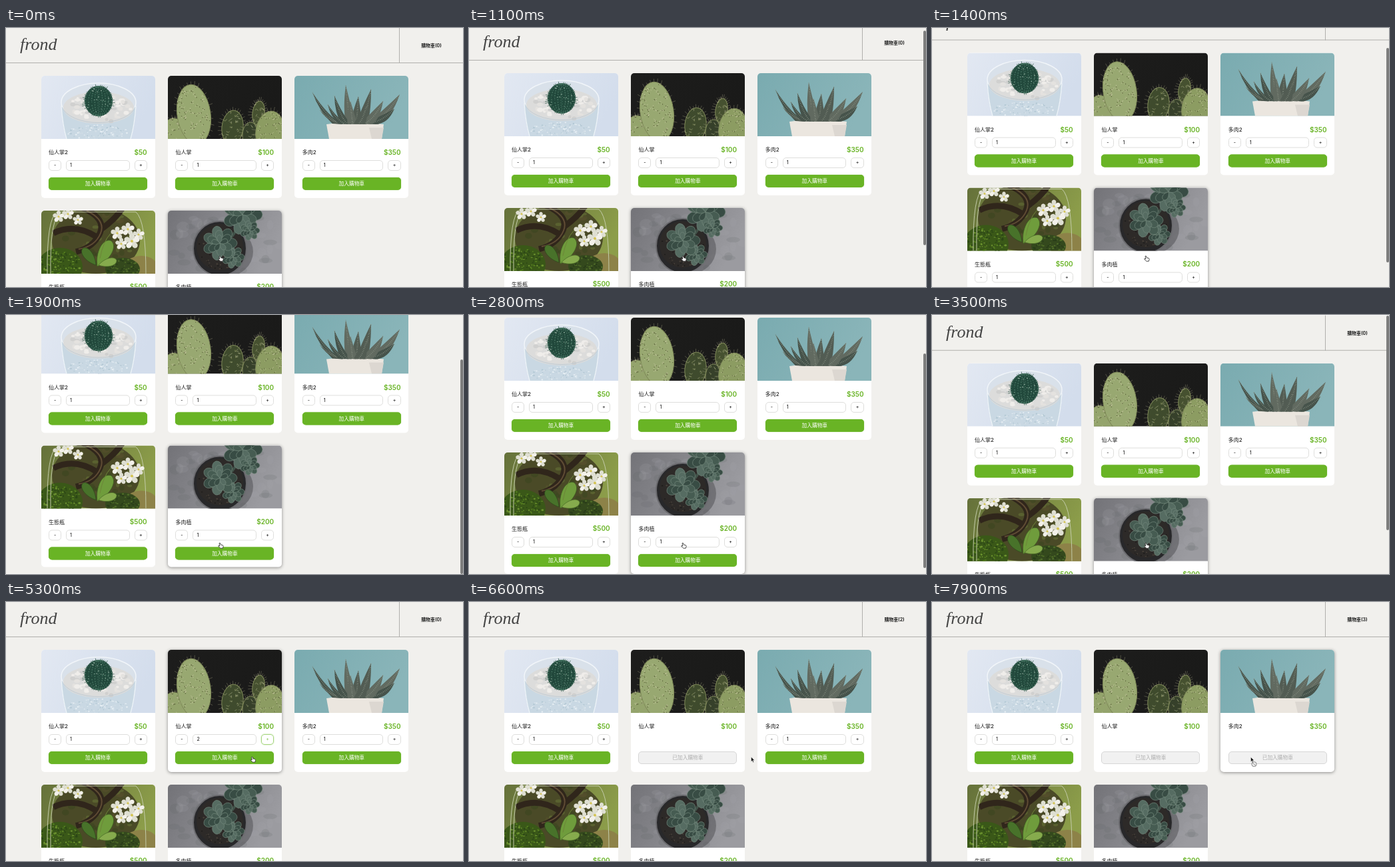
These frames come from a looping animation (686 by 390 pixels, 8000 ms). An HTML page:

```html
<!DOCTYPE html>
<html lang="zh-Hant">
<head>
<meta charset="utf-8">
<title>frond</title>
<style>
html, body { margin: 0; width: 100%; height: 100%; overflow: hidden; background: #fff; }
body { position: relative; font: 500 8px/12px Inter, "Noto Sans CJK TC", "Noto Sans CJK", sans-serif; color: #222; }
div, span, svg { position: absolute; box-sizing: border-box; white-space: nowrap; }
#page { left: 0; top: 0; width: 686px; height: 467.5px; background: #f1f0ed; }
#head { left: 0; top: 0; width: 686px; height: 53px; border-bottom: 1px solid #b0afac; }
#logo { left: 21px; top: 10px; font: italic 26px/30px "Liberation Serif", serif; color: #444; }
#cart { left: 590px; right: 0; height: 53px; border-left: 1px solid #b0afac; text-align: center; font-size: 6.9px; line-height: 53px; font-weight: 700; }
.card { width: 171.2px; height: 183.5px; border-radius: 5px; background: #fff; }
.card svg { left: 0; top: 0; width: 100%; height: 95px; border-radius: 5px 5px 0 0; }
.name { left: 11.5px; top: 109px; }
.price { right: 12px; top: 108.5px; font-size: 10px; font-weight: 600; color: #67b323; }
.box { top: 127px; height: 16px; border: 1px solid #dededc; border-radius: 5px; font-size: 7px; line-height: 14px; text-align: center; }
.minus { left: 11.5px; width: 19px; }
.qty { left: 37.5px; width: 95.5px; padding-left: 5px; text-align: left; }
.plus { left: 140px; width: 19.5px; }
.plus.focus { border-color: #a3d57c; box-shadow: 0 0 2px #b9e09a; color: #8fca5e; }
.add { left: 11.5px; top: 153px; width: 148px; height: 19px; border-radius: 5px; background: #69b425; box-shadow: 0 0 1px #69b425; color: #fff; text-align: center; font-size: 7.7px; line-height: 19px; font-weight: 400; }
.added .box { display: none; }
.added .add { background: #f1f1f1; border: 1px solid #d6d6d6; box-shadow: none; color: #b0b0b0; line-height: 17px; }
#thumb { left: 682px; width: 3.5px; height: 323px; border-radius: 2px; background: #7d7d7d; }
#cursor { left: 0; top: 0; width: 16px; height: 18px; overflow: visible; }
</style>
</head>
<body>
<div id="page">
  <div id="head"><span id="logo">frond</span><div id="cart"></div></div>
</div>
<div id="thumb"></div>
<svg id="cursor" stroke-linejoin="round">
  <path id="hand" d="M0 .7Q1 -.3 1.8 .8L2.5 3L5.2 3.6Q6.4 4 6.1 5.4L5.4 8.2H1.7L-1.4 4.9Q-1.3 3.8 0 4.4L.9 4.8Z" fill="#fff" stroke="#222" stroke-width=".8"/>
  <path id="arrow" d="M0 0V7.2L1.7 5.7L2.9 8.4L4.1 7.8L2.9 5.2H5.2Z" fill="#111" stroke="#fff" stroke-width=".5"/>
  <g id="denied" fill="#eee" stroke="#888" stroke-width="1"><circle cx="5" cy="10.7" r="3.6"/><path d="M2.6 8.3L7.4 13.1"/></g>
</svg>
<script>
const LOOP = 8000, STEP = 100;
const $ = id => document.getElementById(id);

// Drawing helpers
let seed = 7;
const rnd = (a = 0, b = 1) => a + (b - a) * ((seed = seed * 16807 % 2147483647) / 2147483647);
const many = (n, draw) => Array.from({ length: n }, (_, i) => draw(i)).join('');
const oval = (x, y, rx, ry, fill, more = '') =>
  `<ellipse cx="${x}" cy="${y}" rx="${rx}" ry="${ry}" fill="${fill}" ${more}/>`;
const shape = (d, fill, more = '') => `<path d="${d}" fill="${fill}" ${more}/>`;
const line = (d, color, width, more = '') => shape(d, 'none', `stroke="${color}" stroke-width="${width}" ${more}`);
const leaf = (x, y, length, width, angle, fill, edge = 'none') =>
  shape(`M0 0C${length * .4} ${-width} ${length * .95} ${-width} ${length} 0C${length * .95} ${width} ${length * .4} ${width} 0 0`,
    fill, `stroke="${edge}" stroke-width=".7" transform="translate(${x} ${y}) rotate(${angle})"`);
const backdrop = (id, from, to) =>
  `<linearGradient id="${id}" x2="1" y2=".3"><stop stop-color="${from}"/><stop offset="1" stop-color="${to}"/></linearGradient>
   <rect width="172" height="95" fill="url(#${id})"/>`;
const specks = (n, x, y, rx, ry, size, colors) => many(n, i => {
  const a = rnd(0, 6.28), r = Math.sqrt(rnd());
  return oval(x + rx * r * Math.cos(a), y + ry * r * Math.sin(a), size * rnd(.5, 1.2), size * rnd(.4, .9), colors[i % colors.length]);
});

const ballCactus = () => backdrop('sky', '#e2e8f2', '#d3ddec') +
  shape('M30 42Q31 75 38 95H134Q141 75 142 42Z', '#c9d8e3') +
  oval(86, 40, 56, 29, '#d9e1ea', 'stroke="#f1f5f9" stroke-width="1.5"') +
  oval(86, 48, 53, 24, '#dcdcdb') +
  specks(80, 86, 50, 50, 20, 4, ['#efedea', '#d0d0cf', '#e4e2df']) +
  specks(110, 86, 85, 47, 11, 1.3, ['#e6eef3', '#b3c8d4', '#d3dfe7']) +
  line('M31 47A56 29 0 0 0 141 47', '#b9c8d3', .8) +
  line('M30 45Q32 75 38 95M142 45Q140 75 134 95', '#eef4f8', 1.3) +
  many(60, i => {
    const c = Math.cos(i / 9.5), s = Math.sin(i / 9.5), r = rnd(21, 26);
    return line(`M${86 + 17 * c} ${38 + 17 * s}L${86 + r * c} ${38 + r * s}`, '#3f6656', .8);
  }) +
  oval(86, 38, 21, 23, '#22493c') +
  many(9, i => oval(86, 38, Math.abs(i - 4) * 4.7 + 1, 22, 'none', 'stroke="#4a7765" stroke-width="1" stroke-dasharray="1.5 2.2"')) +
  specks(50, 86, 38, 19, 20, .9, ['#9db5a6', '#173a30']);

const pad = (x, y, rx, ry, fill, tilt = 0) => `<g transform="rotate(${tilt} ${x} ${y})">` +
  oval(x, y, rx, ry, fill, 'stroke="#7f8a58" stroke-width="1"') +
  many(Math.round(rx * ry / 16), () => {
    const a = rnd(0, 6.28), r = Math.sqrt(rnd()), px = x + rx * r * Math.cos(a), py = y + ry * r * Math.sin(a);
    return line(`M${px} ${py}l${rnd(-4, 4)} ${rnd(-4, 2)}M${px} ${py}l${rnd(-3, 3)} ${rnd(-4, 3)}`, '#d6d5b0', .4) +
      oval(px, py, .8, .8, '#5f6b3c');
  }) +
  many(30, i => {
    const c = Math.cos(i / 4.8), s = Math.sin(i / 4.8);
    return line(`M${x + rx * c} ${y + ry * s}l${rnd(3, 7) * c} ${rnd(3, 7) * s}`, '#98977a', .4);
  }) + '</g>';
const pearCactus = () => backdrop('night', '#1d1d1c', '#1a1a19') +
  pad(97, 78, 16, 26, '#3f4b2d', 6) + pad(136, 56, 9, 18, '#465130', 8) + pad(124, 90, 12, 20, '#36402a') +
  pad(153, 84, 21, 31, '#8c9c62', 8) + pad(9, 88, 19, 24, '#94a46c') + pad(39, 58, 25, 45, '#98a871', -8);

const agave = () => backdrop('teal', '#7aabb0', '#8ab5b9') +
  shape('M48 73Q90 67 134 73L131 95H52Z', '#ebe6df') + shape('M112 78H134L131 95H116Z', '#dcd7d1') +
  [[27, 25], [158, 28], [38, 51], [150, 50], [77, 14], [115, 20], [60, 30], [133, 38], [96, 31], [50, 43], [84, 38], [108, 45]].map(([x, y], i) => {
    const base = 90 + (x - 90) * .4, cx = 90 + (x - 90) * .72, cy = 78 - (78 - y) * .38;
    return shape(`M${base - 8} 72Q${cx - 8} ${cy - 5} ${x} ${y}Q${cx + 7} ${cy + 5} ${base + 8} 73Z`, ['#46534b', '#616a60', '#525c53'][i % 3]) +
      line(`M${base} 71Q${cx} ${cy} ${x} ${y}`, '#8d9688', 2, 'stroke-dasharray=".6 2"');
  }).join('');

const orchid = (x, y, size) => many(5, i => leaf(x, y, size, size * .45, i * 72 - 90, i % 2 ? '#f3f1ea' : '#dfdfd2')) +
  oval(x, y, size * .17, size * .17, '#d4c453');
const terrarium = () => backdrop('garden', '#65713a', '#8c9d4a') +
  oval(82, 45, 66, 50, '#4a4a27') + oval(150, 88, 26, 20, '#8d8248') +
  specks(40, 95, 40, 65, 42, 5, ['#38451f80', '#6a793a80', '#58512f80']) +
  line('M62 -4Q98 12 88 34T52 62M90 28Q112 12 122 -4M18 34Q50 18 84 40', '#30261b', 9) +
  line('M68 0Q97 14 89 34T56 58', '#5f4b34', 2) +
  oval(28, 85, 34, 29, '#3a5818') + specks(140, 28, 84, 32, 27, 1.6, ['#56801f', '#2c4716', '#6c922f']) +
  oval(122, 88, 26, 17, '#34491d') + specks(70, 122, 88, 25, 15, 1.6, ['#4f6c28', '#283c18']) +
  leaf(84, 84, 44, 13, -62, '#6f9c3c', '#3d5c20') + leaf(82, 82, 32, 9, -128, '#48722a', '#2f4c1c') + leaf(86, 82, 28, 8, -15, '#86ab4d', '#4a6a28') +
  line('M88 72Q98 20 132 26', '#6d8639', 1) +
  line('M9 95Q8 10 24 2H142Q157 15 157 95M14 95Q13 20 25 8', '#c3cba9', 1) +
  [[26, 9, 9], [40, 5, 9], [55, 14, 8], [114, 34, 10], [130, 28, 10], [136, 46, 12], [120, 50, 9], [146, 36, 9]]
    .map(f => orchid(...f)).join('');

const rosette = (x, y, size) => [1, .75, .48].map((k, ring) => many(7 - ring, i =>
  leaf(x, y, size * k, size * k * .38, i * 360 / (7 - ring) + ring * 25, ['#384c44', '#465c52', '#566c62'][(i + ring) % 3], '#71867a'))).join('');
const succulent = () => backdrop('stone', '#737378', '#9b9ba0') +
  specks(60, 86, 48, 84, 46, 9, ['#a5a5aa28', '#5d5e6328']) +
  oval(86, 62, 42, 38, '#4e4f5280') + oval(78, 57, 40, 41, '#28282a', 'stroke="#6b6b6f" stroke-width="2"') +
  oval(78, 55, 35, 35, '#2d2a28') + specks(60, 78, 58, 32, 30, 1.3, ['#494139', '#1d1b1a']) +
  line('M84 50Q105 35 110 8', '#42534a', 4) + rosette(98, 70, 17) + rosette(112, 6, 30) + rosette(123, 30, 15) + rosette(78, 49, 26);

// Page content
const products = [
  ['仙人掌2', 50, ballCactus], ['仙人掌', 100, pearCactus], ['多肉2', 350, agave],
  ['生態瓶', 500, terrarium], ['多肉植', 200, succulent]
];
const cards = products.map(([name, price, photo], i) => {
  const card = document.createElement('div');
  card.className = 'card';
  card.style.left = 52.5 + 190.4 * (i % 3) + 'px';
  card.style.top = 72 + 202.6 * Math.floor(i / 3) + 'px';
  card.innerHTML = `<svg viewBox="0 0 171.2 95">${photo()}</svg>
    <span class="name">${name}</span><span class="price">$${price}</span>
    <div class="box minus">-</div><div class="box qty">1</div><div class="box plus">+</div><div class="add"></div>`;
  $('page').append(card);
  return card;
});

// Timeline: lists of [time, value]
const scrollKeys = [[1000, 0], [1100, 4], [1200, 14], [1400, 34.5], [1600, 57], [1750, 72], [1900, 78.5], [2100, 78],
  [2650, 78], [2800, 68], [3000, 38], [3200, 12], [3350, 1], [3500, -.7], [3700, 0]];
const barKeys = [[1000, 0], [1100, 1], [4000, 1], [4300, 0]];
const xKeys = [[3900, 320], [4500, 391], [5000, 391], [5250, 368.5], [6400, 368.5], [6800, 478.5]];
const yKeys = [[3900, 343], [4500, 206], [5000, 206], [5250, 233], [6400, 233], [6800, 233.5]];
const hoverKeys = {
  1: [[4300, 0], [4500, 1], [6400, 1], [6600, 0]],
  2: [[6600, 0], [6800, 1]],
  4: [[4100, 1], [4300, 0]]
};
const PLUS = 4800, ADD_FIRST = 5700, ADD_SECOND = 6900;

function at(t, keys) {
  const i = keys.findIndex(k => k[0] > t);
  if (i < 0) return keys[keys.length - 1][1];
  if (i === 0) return keys[0][1];
  const [t0, a] = keys[i - 1], [t1, b] = keys[i];
  return a + (b - a) * (t - t0) / (t1 - t0);
}

function render(t) {
  const scroll = at(t, scrollKeys);
  $('page').style.transform = `translateY(${-scroll}px)`;
  $('thumb').style.top = 1 + Math.max(0, scroll) * .835 + 'px';
  $('thumb').style.opacity = at(t, barKeys);
  $('cart').textContent = `購物車(${t < ADD_FIRST ? 0 : t < ADD_SECOND ? 2 : 3})`;

  cards.forEach((card, i) => {
    const added = i === 1 && t >= ADD_FIRST || i === 2 && t >= ADD_SECOND;
    const hover = hoverKeys[i] ? at(t, hoverKeys[i]) : 0;
    card.classList.toggle('added', added);
    card.style.boxShadow = `0 1px 5px rgba(0,0,0,${.42 * hover})`;
    card.querySelector('.add').textContent = added ? '已加入購物車' : '加入購物車';
  });
  cards[1].querySelector('.qty').textContent = t < PLUS ? 1 : 2;
  cards[1].querySelector('.plus').classList.toggle('focus', t >= PLUS);

  const crossing = t >= 6500 && t < 6700;
  const denied = t >= ADD_FIRST && t < 6500 || t >= ADD_SECOND;
  $('cursor').style.transform = `translate(${at(t, xKeys)}px,${at(t, yKeys)}px)`;
  $('hand').style.display = denied || crossing ? 'none' : '';
  $('arrow').style.display = denied || crossing ? '' : 'none';
  $('denied').style.display = denied ? '' : 'none';
}

function tick() {
  render(Math.floor(performance.now() % LOOP / STEP) * STEP);
  requestAnimationFrame(tick);
}
tick();
</script>
</body>
</html>
```
